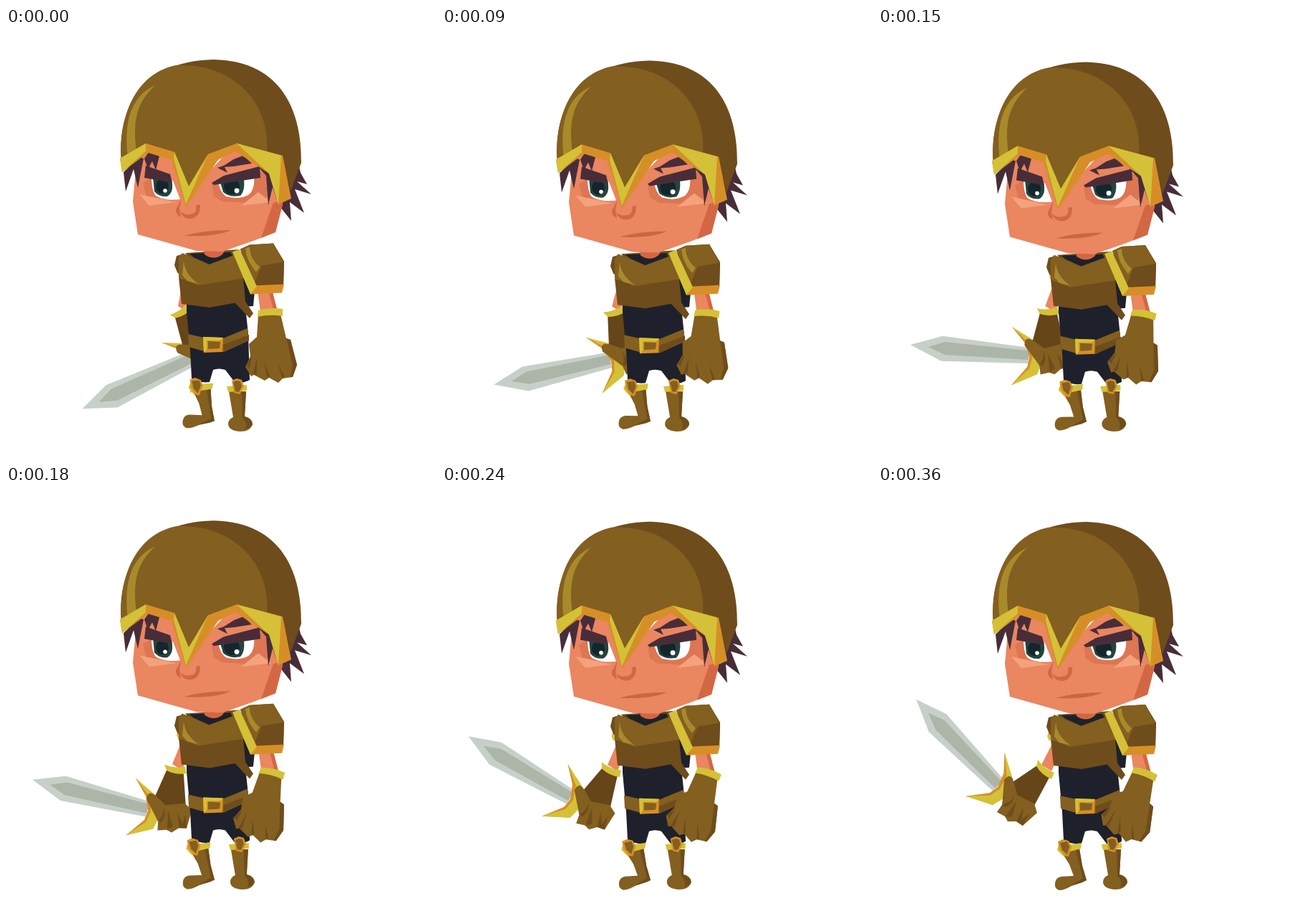
These frames come from a looping animation (600x600 px, 8 s). An HTML page with a canvas:

```html
<!DOCTYPE html>
<html lang="en">
<head>
<meta charset="utf-8">
<title>Knight</title>
<style>
html, body { margin: 0; width: 100%; height: 100%; overflow: hidden; background: #fff; }
canvas { display: block; width: 100vmin; height: 100vmin; }
</style>
</head>
<body>
<canvas id="stage" width="600" height="600"></canvas>
<script>
const ctx = document.getElementById('stage').getContext('2d');
const LOOP = 8000, STEP = 30, LAST = 12;

const BROWN = '#835f20', DARK = '#6f4c1b', DEEP = '#664519', SHINE = '#a88a2c';
const GOLD = '#d4c137', ORANGE = '#d68f27', SUIT = '#1e212b', HAIR = '#482d39';
const SKIN = '#ea8660', SHADE = '#d36744', SOFT = '#dd7652', BLUSH = '#f4a27c';

// Pose keys, one every second step
const keys = {
  body: [0, .13, .42, .72, .94, 1, 1],
  wristX: [245, 244, 240, 237, 236, 234, 233],
  wristY: [395, 396, 395, 395, 396, 396, 396],
  arm: [-8, 2, 16, 37, 57.7, 69, 73.4],
  blade: [-25, -19, -4, 14, 30.5, 42, 46]
};

function sample(list, step) {
  const pos = step / 2, i = Math.min(Math.floor(pos), list.length - 2), u = pos - i;
  const at = n => list[Math.max(0, Math.min(list.length - 1, n))];
  const [a, b, c, d] = [at(i - 1), at(i), at(i + 1), at(i + 2)];
  return b + u / 2 * (c - a + u * (2 * a - 5 * b + 4 * c - d + u * (3 * (b - c) + d - a)));
}

const paths = {};
function fill(color, d) {
  ctx.fillStyle = color;
  ctx.fill(paths[d] || (paths[d] = new Path2D(d)));
}

function oval(color, x, y, rx, ry = rx) {
  ctx.fillStyle = color;
  ctx.beginPath();
  ctx.ellipse(x, y, rx, ry, 0, 0, Math.PI * 2);
  ctx.fill();
}

function group(dx, dy, draw) {
  ctx.save();
  ctx.translate(dx, dy);
  draw();
  ctx.restore();
}

// Rotates about a pivot, in degrees
function turn(x, y, deg, draw) {
  ctx.save();
  ctx.translate(x, y);
  ctx.rotate(deg * Math.PI / 180);
  ctx.translate(-x, -y);
  draw();
  ctx.restore();
}

// Blade points left, guard at the origin
function sword() {
  fill('#c6d0c9', 'M-163,-1L-119,-17L2,-11L3,11L-118,18Z');
  fill('#adb5a8', 'M-138,0L-115,-9L3,-7L3,6L-114,9Z');
  fill(BROWN, 'M4,-6L34,-6L34,7L4,7Z');
  fill(ORANGE, 'M-24,-38L9,-20L17,0L16,25L-18,43L2,16L4,2L-4,-17Z');
  fill(GOLD, 'M-24,-38L12,-20L22,4L17,25L-18,43L5,18L8,2L1,-18Z');
}

function leftGlove() {
  fill(DEEP, 'M222,390L240,405L218,446L190,438L188,413Z');
  fill(BROWN, 'M190,414L194,431L218,443L222,456L202,474L193,468L181,468L177,461L166,455L173,445L174,436L176,410Q182,402 187,407Z');
  fill(DARK, 'M178,461L193,440L187,462ZM193,468L203,449L200,466L211,457L202,474Z');
  fill(DARK, 'M175,444Q188,440 190,432Q188,446 175,448Z');
  fill(GOLD, 'M223,382Q231,394 246,400L242,409Q228,403 221,391Z');
}

function leftArm(step, p) {
  const x = sample(keys.wristX, step), y = sample(keys.wristY, step);
  const rad = sample(keys.arm, step) * Math.PI / 180, tilt = sample(keys.blade, step);
  group(x - 70 * Math.sin(rad), y + 69 * Math.cos(rad), () => turn(0, 0, tilt, sword));
  ctx.fillStyle = SKIN;
  ctx.beginPath();
  ctx.moveTo(249, 343 + 5 * p);
  ctx.lineTo(259, 355 + 5 * p);
  ctx.lineTo(x + 9, y + 2);
  ctx.lineTo(x - 5, y - 7);
  ctx.fill();
  group(x - 233, y - 396, () => turn(233, 396, tilt - 46, leftGlove));
}

function leftBoot() {
  fill(BROWN, 'M257,512L281,506L285,530L291,550L285,553L270,558Q260,564 253,564Q246,562 247,554Q248,546 256,545L273,544L267,528Z');
  fill(DARK, 'M276,508L281,506L285,530L291,550L285,553L269,558L286,547Z');
  fill(GOLD, 'M251,503L284,498L283,506L268,510L259,517L250,508Z');
  fill(ORANGE, 'M251,496L258,493L266,495L270,503L266,517L260,516L253,507Z');
  fill(BROWN, 'M254,498L264,496L267,503L264,514L257,508Z');
}

function rightBoot() {
  fill(BROWN, 'M315,507L339,507L337,542Q348,545 348,553Q345,563 331,563Q315,562 314,553Q314,546 321,543Z');
  fill(DARK, 'M333,507L339,507L337,542Q348,545 348,553Q345,558 338,560Q342,551 334,544Z');
  fill(GOLD, 'M312,500L340,498L340,506L314,508Z');
  fill(ORANGE, 'M319,492L326,489L333,491L336,500L330,511L322,509Z');
  fill(BROWN, 'M321,494L326,492L331,493L333,500L329,508L324,507Z');
}

function torso(q) {
  fill(DARK, 'M250,319L325,314L338,330L270,340Z');
  fill(SUIT, 'M254,321L313,318L347,372L345,393L334,394L338,432L340,496Q329,502 319,499L306,482Q297,479 289,482L284,499Q271,501 259,494L257,455L252,400L252,385Z');
  fill(DARK, 'M252,321L265,321L285,334L275,340L244,330Z');
  fill(SUIT, 'M256,320L314,318L309,326L284,335L262,325Z');
  fill(SHADE, 'M276,315L306,315L302,321Q290,330 277,321Z');

  group(7 * q, 0, () => fill(GOLD, 'M239,341L243,352L239,356L236,349Z'));
  fill(DARK, 'M238,323L248,320L245,352L239,346L235,336Z');
  fill(DARK, 'M319,388L333,385L345,403L340,410Z');
  fill(DARK, 'M241,353L268,363L331,354L334,386L284,395L245,390Z');
  fill(BROWN, 'M241,325L246,319L283,335L318,322L330,326L334,354L268,364L241,353Z');
  fill(SHINE, 'M248,329Q249,349 269,362L253,358L246,350Z');

  fill(BROWN, 'M254,432L276,437L303,438L337,424L339,441L304,457L276,456L255,450Z');
  fill(DARK, 'M303,447L339,433L339,441L304,457Z');
  fill(ORANGE, 'M275,436L303,437L302,457L276,458Z');
  fill(GOLD, 'M275,436L303,437L299,441L280,441L280,454L276,458Z');
  fill(BROWN, 'M282,442L299,443L298,452L282,453Z');
}

function rightGlove() {
  fill(BROWN, 'M352,400L383,399L391,433L397,435L406,470L400,487L386,489L380,495L367,488L361,492L346,484L342,486L334,473L341,458L339,441L350,431Z');
  fill(DARK, 'M391,433L397,435L406,470L400,487L397,487L400,470Z');
  fill(DARK, 'M345,484L350,460L350,483ZM365,489L360,466L368,485ZM386,489L379,468L389,487ZM334,472L343,458L340,474Z');
  fill(GOLD, 'M352,394Q369,389 386,392L386,402Q368,399 351,403Z');
}

function rightArm(p) {
  group(2 * p, 5 * p, () => {
    fill(SKIN, 'M351,366L371,365L379,396L355,396Z');
    fill(SHADE, 'M366,366L371,365L379,396L374,396Z');
  });
  group(3 * p, 4 * p, () => turn(368, 398, 22 * p, rightGlove));
}

function shoulder() {
  fill(DARK, 'M327,313L340,307L373,305L388,330L387,364L346,366Z');
  fill(BROWN, 'M327,313L340,307L373,305L387,331L356,338L346,362Z');
  fill(DARK, 'M357,336L388,331L387,363L346,365Z');
  fill(SHINE, 'M334,312L340,310Q340,326 354,338L349,345Q335,329 334,312Z');
  fill(ORANGE, 'M344,364L388,362L385,374L341,376Z');
  fill(GOLD, 'M316,317L326,313L350,365L341,376Z');
}

function eyes() {
  fill(SOFT, 'M191,222L203,215L238,245L228,249L196,241Z');
  fill(SOFT, 'M287,223L362,205L370,240L340,250L302,248L290,241Z');
  fill(BLUSH, 'M186,238L238,249L200,254Z');
  fill(BLUSH, 'M328,254L352,235L370,249Z');

  fill('#fff', 'M203,213L233,219L243,245Q222,248 209,240Q203,233 203,213Z');
  fill('#24443f', 'M205,213L231,218Q235,235 225,241Q213,242 207,234Z');
  oval('#14262b', 218, 227, 9, 10);
  oval('#fff', 222, 233, 2.8);

  fill('#fff', 'M296,219L346,210Q348,232 338,239Q325,246 307,241Q298,235 296,219Z');
  fill('#24443f', 'M298,218L331,212Q335,231 327,240Q312,243 303,235Z');
  oval('#14262b', 315, 227, 11, 11);
  oval('#fff', 322, 233, 3.4);

  fill(HAIR, 'M195,198L229,210L232,222L193,215Z');
  fill(HAIR, 'M287,222L304,212L354,199L355,215L290,225Z');
}

function face() {
  fill(HAIR, 'M407,190L411,208L420,224L406,220L426,238L403,231L416,264L396,249L398,275L382,255L372,220Z');
  fill(SKIN, 'M182,195L177,248L184,294L266,317L302,318L345,303L376,291L386,252L384,200L320,168L256,235L236,172L196,170Z');
  fill(SHADE, 'M386,246L385,256L376,291L356,299L367,267L373,250Z');
  eyes();
  fill(SHADE, 'M245,244L237,259Q236,266 244,270L242,258Z');
  fill(SHADE, 'M243,262Q246,272 258,272Q271,270 271,254Q268,250 265,255Q267,265 256,266Q249,267 243,262Z');
  fill('#cb6740', 'M248,296Q275,288 314,288Q292,298 248,296Z');
  fill(HAIR, 'M164,207L186,186L192,188L184,229L178,203L167,234Z');
  fill(HAIR, 'M193,188L200,178L214,185L209,204L204,192L198,203Z');
  fill(HAIR, 'M295,201L304,198L318,189L331,184L343,195L318,199L305,200L309,208Z');
  fill(HAIR, 'M340,186L374,203L378,246L372,228L366,253L363,212Z');
}

function helmet() {
  fill(DARK, 'M161,190C156,130 180,52 290,50C388,52 413,127 412,194L397,234L386,190L322,172L282,188L255,232L236,184L195,172Z');
  fill(BROWN, 'M161,190C157,132 179,70 237,58C316,54 371,110 364,182L322,172L282,188L255,232L236,184L195,172Z');
  fill(SHINE, 'M208,86C170,103 165,145 170,186L182,177C177,137 181,111 208,86Z');
  fill(ORANGE, 'M159,188L195,167L235,179L255,227L282,182L322,167L386,184L398,244L380,252L367,209L320,178L296,190L251,256L231,190L198,180L162,207Z');
  fill(GOLD, 'M159,188L195,167L195,178L162,207Z');
  fill(GOLD, 'M235,179L255,227L282,182L251,252L234,188Z');
  fill(GOLD, 'M322,167L384,184L380,252L367,209Z');
}

function draw(step) {
  const p = sample(keys.body, step), q = 1 - p;
  ctx.fillStyle = '#fff';
  ctx.fillRect(0, 0, 600, 600);
  leftArm(step, p);
  group(0, -5 * q, () => torso(q));
  group(0, -4 * q, () => turn(270, 550, 6 * q, leftBoot));
  group(-4 * q, 0, rightBoot);
  rightArm(p);
  group(0, -4.5 * q, shoulder);
  group(0, -6 * q, () => {
    face();
    helmet();
  });
}

const start = performance.now();
function tick() {
  const time = (performance.now() - start) % LOOP;
  draw(Math.min(LAST, Math.floor(time / STEP)));
  requestAnimationFrame(tick);
}
tick();
</script>
</body>
</html>
```
